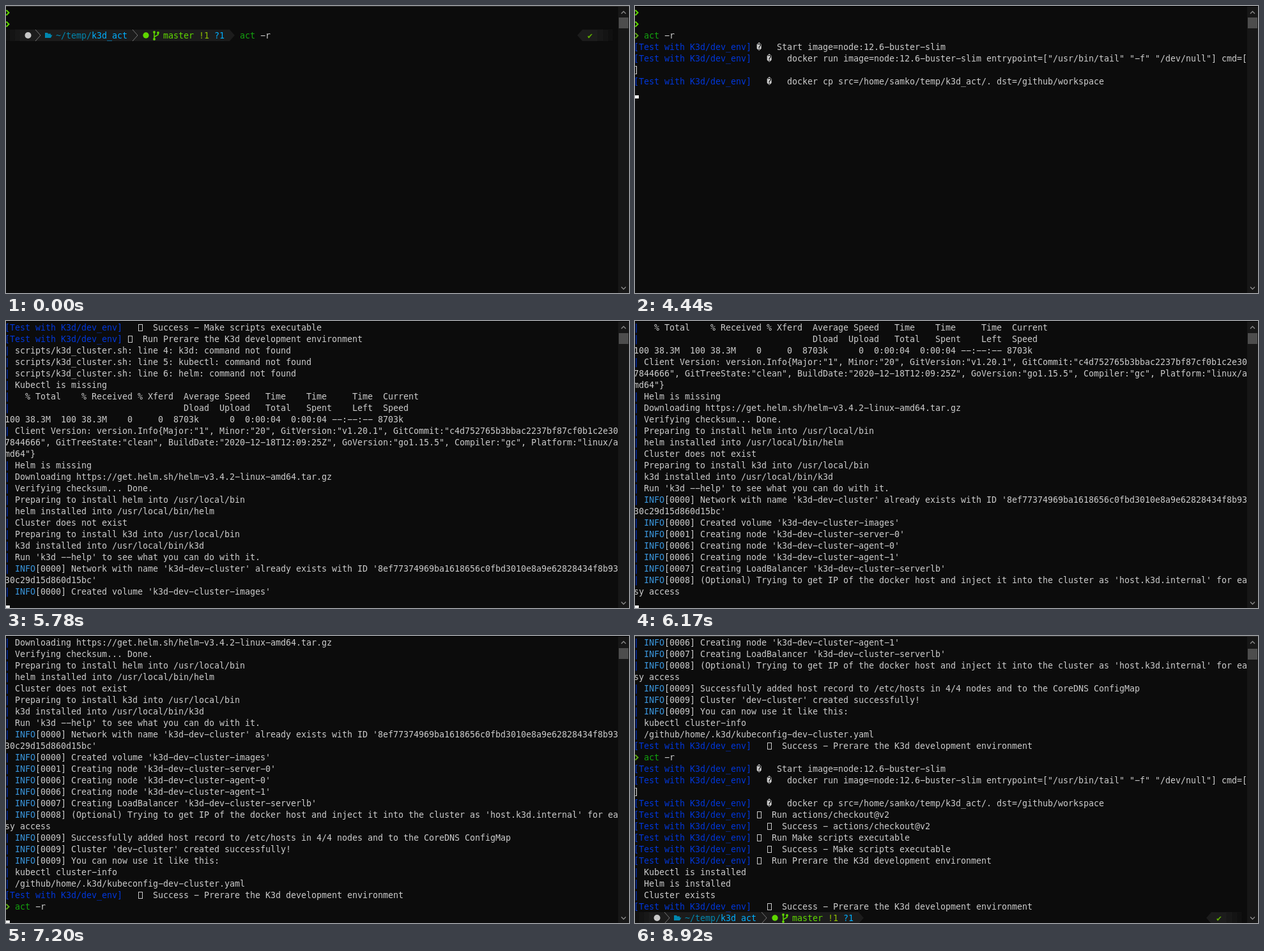
An HTML page with a canvas for the animation above (9070 ms loop, 975 by 450 pixels).

```html
<!DOCTYPE html>
<html lang="en">
<head>
<meta charset="utf-8">
<title>Terminal session</title>
<style>
html, body { margin: 0; width: 100%; height: 100%; overflow: hidden; background: #0c0c0c; }
canvas { display: block; width: 975px; height: 450px; }
</style>
</head>
<body>
<canvas id="term" width="975" height="450"></canvas>
<script>
const ctx = document.getElementById('term').getContext('2d');
const LOOP = 9070, COLS = 120, ROWS = 25, CELL = 8, LINE = 18;
const FG = '#cccccc', BG = '#0c0c0c', BLUE = '#0037da', GREEN = '#13a10e',
  LIME = '#5fd700', CYAN = '#3a96dd', SKY = '#00afff', TEAL = '#0087af', SEGMENT = '#1c1c1c';

const job = '[Test with K3d/dev_env]';
const run = name => `${job} \u25af  Run ${name}`;
const done = name => `${job}   \u25af  Success - ${name}`;
const info = (sec, text) => `| INFO[000${sec}] ${text}`;
const setup = [
  '\u276f act -r',
  job + ' \ufffd   Start image=node:12.6-buster-slim',
  job + '   \ufffd   docker run image=node:12.6-buster-slim entrypoint=["/usr/bin/tail" "-f" "/dev/null"] cmd=[]',
  job + '   \ufffd   docker cp src=/home/samko/temp/k3d_act/. dst=/github/workspace',
  run('actions/checkout@v2'),
  done('actions/checkout@v2'),
  run('Make scripts executable'),
  done('Make scripts executable'),
  run('Prerare the K3d development environment')
];
const finish = done('Prerare the K3d development environment');

const log = [
  '\u276f', '\u276f',
  ...setup,
  '| scripts/k3d_cluster.sh: line 4: k3d: command not found',
  '| scripts/k3d_cluster.sh: line 5: kubectl: command not found',
  '| scripts/k3d_cluster.sh: line 6: helm: command not found',
  '| Kubectl is missing',
  '|   % Total    % Received % Xferd  Average Speed   Time    Time     Time  Current',
  '|' + ' '.repeat(34) + 'Dload  Upload   Total   Spent    Left  Speed',
  '100 38.3M  100 38.3M    0     0  8703k      0  0:00:04  0:00:04 --:--:-- 8703k',
  '| Client Version: version.Info{Major:"1", Minor:"20", GitVersion:"v1.20.1", GitCommit:"c4d752765b3bbac2237bf87cf0b1c2e307844666", GitTreeState:"clean", BuildDate:"2020-12-18T12:09:25Z", GoVersion:"go1.15.5", Compiler:"gc", Platform:"linux/amd64"}',
  '| Helm is missing',
  '| Downloading https://get.helm.sh/helm-v3.4.2-linux-amd64.tar.gz',
  '| Verifying checksum... Done.',
  '| Preparing to install helm into /usr/local/bin',
  '| helm installed into /usr/local/bin/helm',
  '| Cluster does not exist',
  '| Preparing to install k3d into /usr/local/bin',
  '| k3d installed into /usr/local/bin/k3d',
  "| Run 'k3d --help' to see what you can do with it.",
  info(0, "Network with name 'k3d-dev-cluster' already exists with ID '8ef77374969ba1618656c0fbd3010e8a9e62828434f8b9330c29d15d860d15bc'"),
  info(0, "Created volume 'k3d-dev-cluster-images'"),
  info(1, "Creating node 'k3d-dev-cluster-server-0'"),
  info(6, "Creating node 'k3d-dev-cluster-agent-0'"),
  info(6, "Creating node 'k3d-dev-cluster-agent-1'"),
  info(7, "Creating LoadBalancer 'k3d-dev-cluster-serverlb'"),
  info(8, "(Optional) Trying to get IP of the docker host and inject it into the cluster as 'host.k3d.internal' for easy access"),
  info(9, 'Successfully added host record to /etc/hosts in 4/4 nodes and to the CoreDNS ConfigMap'),
  info(9, "Cluster 'dev-cluster' created successfully!"),
  info(9, 'You can now use it like this:'),
  '| kubectl cluster-info',
  '| /github/home/.k3d/kubeconfig-dev-cluster.yaml',
  finish,
  ...setup,
  '| Kubectl is installed',
  '| Helm is installed',
  '| Cluster exists',
  finish
];
// Wrap the log to the terminal width.
const rows = log.flatMap(s => s.match(new RegExp(`.{1,${COLS}}`, 'gu')));

// [time, rows printed, prompt: 0 none, 1 empty, 2 with command]
const steps = [
  [0, 2, 2], [730, 3, 0], [780, 4, 0], [1900, 6, 0],
  [4440, 7, 0], [4520, 8, 0], [4590, 10, 0], [4670, 12, 0], [4750, 15, 0], [4830, 16, 0],
  [4990, 18, 0], [5070, 22, 0], [5140, 23, 0], [5220, 24, 0], [5300, 27, 0], [5370, 28, 0],
  [5550, 30, 0], [5630, 31, 0], [5710, 33, 0], [5780, 34, 0], [5860, 36, 0],
  [6090, 38, 0], [6170, 40, 0],
  [6400, 41, 0], [6480, 43, 0], [6560, 45, 0], [6640, 46, 0], [6720, 46, 1], [6800, 46, 2],
  [7200, 47, 0], [7280, 48, 0], [7360, 50, 0], [7440, 51, 0], [7510, 53, 0], [7590, 55, 0], [7670, 56, 0],
  [7900, 59, 0], [7980, 60, 1]
];

const colX = col => col * CELL - 2;

function rect(x, y, w, h, color) {
  ctx.fillStyle = color;
  ctx.fillRect(x, y, w, h);
}

function line(points, color, width) {
  ctx.strokeStyle = color;
  ctx.lineWidth = width;
  ctx.beginPath();
  points.forEach(([x, y]) => ctx.lineTo(x, y));
  ctx.stroke();
}

function shape(points, color) {
  ctx.fillStyle = color;
  ctx.beginPath();
  points.forEach(([x, y]) => ctx.lineTo(x, y));
  ctx.fill();
}

function dot(x, y, r, color) {
  ctx.fillStyle = color;
  ctx.beginPath();
  ctx.arc(x, y, r, 0, 7);
  ctx.fill();
}

function glyph(ch, x, y, color) {
  if (ch === ' ') return;
  if (ch === '\u276f') {
    line([[0.5, y + 5.5], [4.5, y + 9.5], [0.5, y + 13.5]], color, 2);
  } else if (ch === '\u25af') {
    ctx.strokeStyle = color;
    ctx.lineWidth = 1;
    ctx.strokeRect(x + 1.5, y + 4.5, 6, 10);
  } else {
    ctx.fillStyle = color;
    ctx.fillText(ch === '-' ? '\u2212' : ch, x, y + 14);
  }
}

function text(str, col, y, color) {
  [...str].forEach((ch, i) => glyph(ch, colX(col + i), y, color));
}

function logRow(str, y) {
  const parts = [
    [/^\[Test with K3d\/dev_env\]/, BLUE], [/^\|/, BLUE], [/^ INFO/, CYAN],
    [/^\u276f/, str.length > 1 ? '#5aa512' : LIME], [/^ act(?= -r$)/, GREEN]
  ];
  let col = 0;
  for (const [pattern, color] of parts) {
    const hit = str.slice(col).match(pattern);
    if (!hit) continue;
    text(hit[0], col, y, color);
    col += hit[0].length;
  }
  text(str.slice(col), col, y, FG);
}

// Shade cell: quarters of each 2x2 block that are filled.
function shade(col, y, level) {
  const order = [0, 3, 1, 2];
  for (let j = 0; j < LINE; j++)
    for (let i = 0; i < CELL; i++)
      if (order.indexOf((j % 2) * 2 + i % 2) < level) rect(colX(col) + i, y + j, 1, 1, SEGMENT);
}

function prompt(y, withCommand) {
  const mid = y + 9, end = y + LINE;
  [1, 2, 3].forEach(n => { shade(n - 1, y, n); shade(119 - n, y, n); });
  rect(22, y, 328, LINE, SEGMENT);
  shape([[350, y], [358, mid], [350, end]], SEGMENT);
  rect(902, y, 24, LINE, SEGMENT);
  shape([[902, y], [894, mid], [902, end]], SEGMENT);

  for (const x of [46, 198]) line([[x, y], [x + 8, mid], [x, end]], '#777777', 1);
  dot(34.5, mid, 5, '#c8c8c8');
  shape([[61, y + 5], [65, y + 5], [66, y + 6.5], [70, y + 6.5], [70, y + 8.5],
    [72.5, y + 8.5], [70, y + 13], [61, y + 13]], TEAL);
  dot(219, mid, 4.7, LIME);
  line([[232, y + 4], [232, y + 15]], LIME, 1.5);
  line([[238, y + 5], [238, y + 8], [232, y + 11.5]], LIME, 1.5);
  [[232, 4], [238, 5], [232, 15]].forEach(([x, dy]) => dot(x, y + dy, 1.9, LIME));

  text('~/temp/', 10, y, TEAL);
  text('k3d_act', 17, y, SKY);
  text('master', 31, y, LIME);
  text('!1', 38, y, '#8fbf00');
  text('?1', 41, y, SKY);
  text('\u2714', 114, y, '#5faf00');
  if (withCommand) {
    text('act', 46, y, GREEN);
    text('-r', 50, y, FG);
  }
}

function scrollbar(thumbY) {
  rect(958, 0, 17, 450, '#171717');
  rect(959, thumbY, 15, 17, '#4d4d4d');
  line([[963, 12], [966.5, 8.5], [970, 12]], '#8a8a8a', 1.4);
  line([[963, 440.5], [966.5, 444], [970, 440.5]], '#8a8a8a', 1.4);
}

function draw([start, count, mode], idle) {
  const top = Math.max(0, count - ROWS + 1);
  const rowY = r => (r - top) * LINE + 1;
  rect(0, 0, 975, 450, BG);
  ctx.font = '13.333px "DejaVu Sans Mono", monospace';
  for (let r = top; r < count; r++) logRow(rows[r], rowY(r));
  if (mode) prompt(rowY(count), mode === 2);
  else rect(0, rowY(count) + 13, 6, 5, '#f2f2f2');
  scrollbar(18 + (start >= 5550) + (start >= 7900));
  rect(0, 0, 975, 1, idle ? '#303030' : '#000000');
}

let shown = '';
function tick() {
  const t = performance.now() % LOOP;
  const step = steps.filter(s => s[0] <= t).pop();
  const idle = t < 570 || t >= 8920;
  const key = step + '/' + idle;
  if (key !== shown) {
    draw(step, idle);
    shown = key;
  }
  requestAnimationFrame(tick);
}
tick();
</script>
</body>
</html>
```
